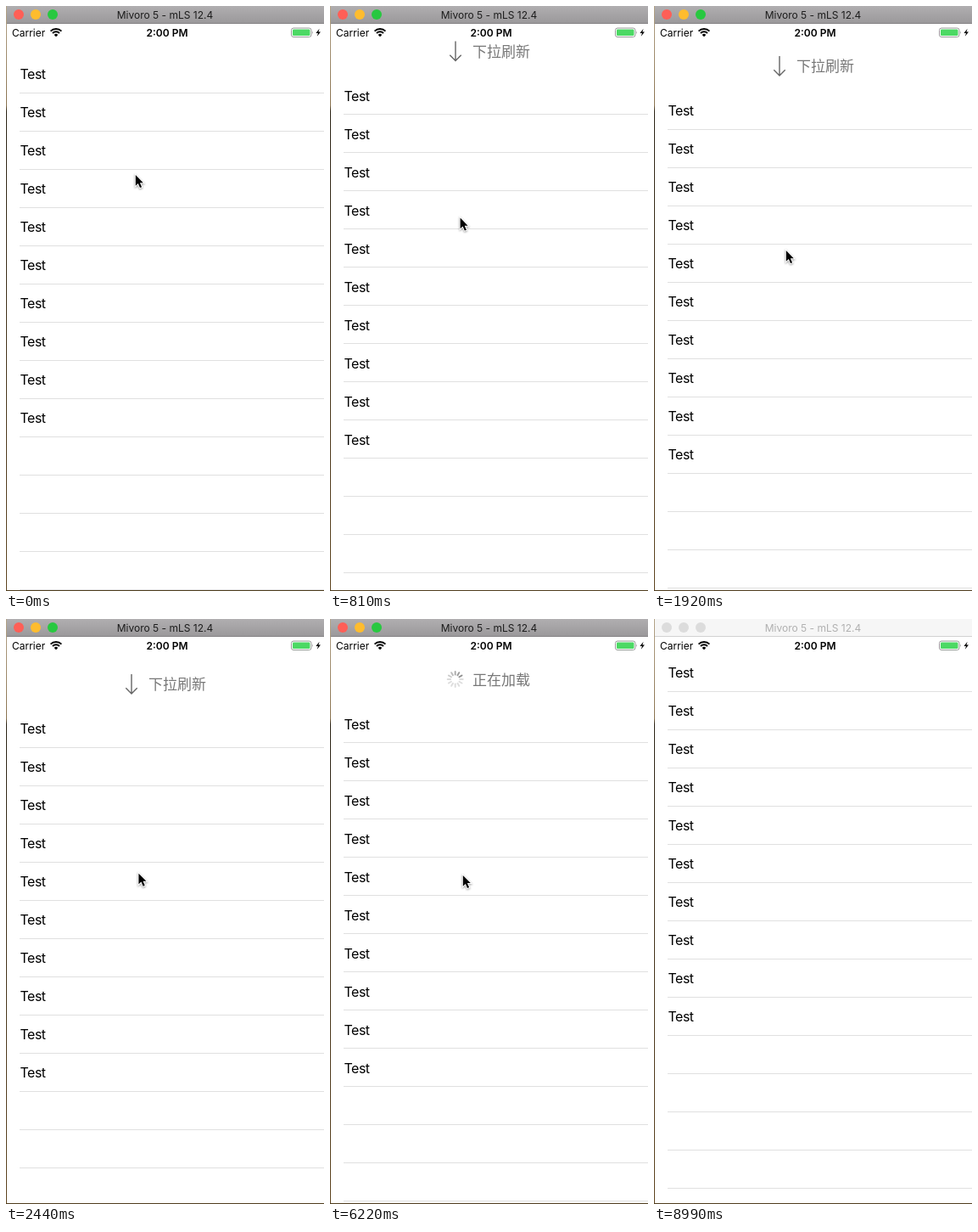
Write an HTML page that moves like this. It is 375 px wide and 689 px high and loops after 9020 ms.

```html
<!DOCTYPE html>
<html lang="zh-CN">
<head>
<meta charset="utf-8">
<title>Pull to refresh</title>
<style>
  html, body { margin: 0; width: 100%; height: 100%; overflow: hidden; background: #fff; }
  svg { display: block; width: 375px; height: 689px; font-family: Inter, "Liberation Sans", sans-serif; }
  .cell { font-size: 16px; letter-spacing: -.5px; }
  .hint { font: 17px "Noto Sans CJK SC", "Noto Sans CJK", sans-serif; fill: #777; }
  .small { font-size: 12px; }
  .bar { fill: url(#chrome); }
  .edge { fill: #858385; }
  .title { fill: #1c1c1c; }
  .inactive .bar { fill: #f6f6f6; }
  .inactive .edge { fill: #d2d2d2; }
  .inactive .title { fill: #b0b0b0; }
  .inactive circle { fill: #dcdcdc; }
  #cursor { filter: drop-shadow(0 1px 1px #0006); }
</style>
</head>
<body>
<svg viewBox="0 0 375 689">
  <defs>
    <linearGradient id="chrome" x2="0" y2="1">
      <stop stop-color="#b0aeb0"/><stop offset="1" stop-color="#9a989a"/>
    </linearGradient>
    <linearGradient id="desk" x2="0" y2="1">
      <stop stop-color="#b5a58a"/><stop offset=".17" stop-color="#8a7350"/>
      <stop offset=".18" stop-color="#2c2416"/><stop offset="1" stop-color="#5f4520"/>
    </linearGradient>
    <clipPath id="below"><path d="M0 41H375V689H0Z"/></clipPath>
  </defs>
  <rect width="375" height="689" fill="#fff"/>

  <g clip-path="url(#below)">
    <g id="lines" fill="#e0e0e0"></g>
    <g id="content">
      <g id="cells" class="cell"></g>
      <path id="arrow" d="M148-1V22M141.3 15.3 148 22 154.7 15.3" fill="none" stroke="#666" stroke-width="1.4"/>
      <g id="spinner" transform="translate(147.7 10.5)" stroke="#888" stroke-width="2" stroke-linecap="round"></g>
      <text id="hint" class="hint" x="168" y="17"></text>
    </g>
  </g>

  <g class="small">
    <text x="7" y="35.5">Carrier</text>
    <text x="190" y="35.5" text-anchor="middle" font-weight="600">2:00 PM</text>
  </g>
  <path d="M52.6 29.6A9 9 0 0 1 65.4 29.6M55 32A5.6 5.6 0 0 1 63 32" fill="none" stroke="#000" stroke-width="2"/>
  <path d="M59 36.2 56.7 33.9A3.2 3.2 0 0 1 61.3 33.9Z"/>
  <rect x="336.5" y="26" width="23.5" height="10.5" rx="2.5" fill="none" stroke="#999"/>
  <rect x="338" y="27.5" width="20.5" height="7.5" rx="1.2" fill="#4cd964"/>
  <path d="M361 29.5Q362.6 31.2 361 33Z" fill="#999"/>
  <path d="M369.6 26.8 365.4 32H368L366.8 35.8 371 30.4H368.4Z"/>

  <g id="frame">
    <rect class="bar" width="375" height="21"/>
    <rect class="edge" y="20" width="375" height="1"/>
    <circle cx="15" cy="10" r="6" fill="#ff5f57"/>
    <circle cx="35" cy="10" r="6" fill="#febc2e"/>
    <circle cx="55" cy="10" r="6" fill="#28c840"/>
    <text class="title small" x="187.5" y="14.6" text-anchor="middle">Mivoro 5 - mLS 12.4</text>
  </g>
  <rect width="1" height="689" fill="url(#desk)"/>
  <rect y="688" width="375" height="1" fill="#4f3d1e"/>
  <path id="cursor" d="M0 0V12.7L3 9.9 5.2 15 7.3 14.1 5.1 9.1H9Z" stroke="#fff" stroke-width="2" paint-order="stroke"/>
</svg>

<script>
const LOOP = 9020, LOADING = 3820, INACTIVE = 8990, ROW = 45;
const $ = id => document.getElementById(id);
const repeat = (n, make) => Array.from({ length: n }, (_, i) => make(i)).join('');

$('lines').innerHTML = repeat(15, i => `<rect x="16" y="${85 + i * ROW}" width="359" height="1"/>`);
$('cells').innerHTML = repeat(10, i => `<text x="16.5" y="${69 + i * ROW}">Test</text>`);
$('spinner').innerHTML = repeat(12, i => `<path d="M0-5.5V-9" transform="rotate(${i * 30})"/>`);
const spokes = [...$('spinner').children];

// Keys are [time, value, ...]
const pull = [[0, 17], [810, 42.5], [1860, 59], [1920, 60], [2270, 65], [2500, 66.5], [2680, 67],
  [LOADING - 1, 67], [LOADING, 58], [4100, 60.5], [8000, 60.5], [8100, 42], [8200, 14], [8300, 0]];
const pointer = [[0, 152.8, 199], [810, 153.6, 249.5], [1920, 155.8, 288], [2270, 156.2, 298], [2680, 156.8, 302],
  [6560, 156.8, 302], [7490, 248, 494], [7890, 282.8, 584], [8400, 297.5, 621], [8690, 335, 692]];

function valueAt(keys, t, k = 1) {
  const next = keys.findIndex(key => key[0] > t);
  if (next < 0) return keys[keys.length - 1][k];
  const a = keys[next - 1], b = keys[next];
  return a[k] + (b[k] - a[k]) * (t - a[0]) / (b[0] - a[0]);
}

function draw(t) {
  const offset = valueAt(pull, t), loading = t >= LOADING;
  $('lines').setAttribute('transform', `translate(0 ${Math.floor(offset)})`);
  $('content').setAttribute('transform', `translate(0 ${Math.round(offset * 2) / 2})`);
  $('cursor').setAttribute('transform', `translate(${valueAt(pointer, t)} ${valueAt(pointer, t, 2)})`);
  $('hint').textContent = loading ? '正在加载' : '下拉刷新';
  $('arrow').style.display = loading ? 'none' : '';
  $('spinner').style.display = loading ? '' : 'none';
  $('frame').classList.toggle('inactive', t >= INACTIVE);

  const head = Math.round(t * 12 / 1000 - 72.9);
  spokes.forEach((spoke, i) => {
    const age = ((head - i) % 12 + 12) % 12;
    spoke.style.opacity = Math.max(.28, .95 - .13 * age);
  });
}

const start = performance.now();
(function tick() {
  draw((performance.now() - start) % LOOP);
  requestAnimationFrame(tick);
})();
</script>
</body>
</html>
```
